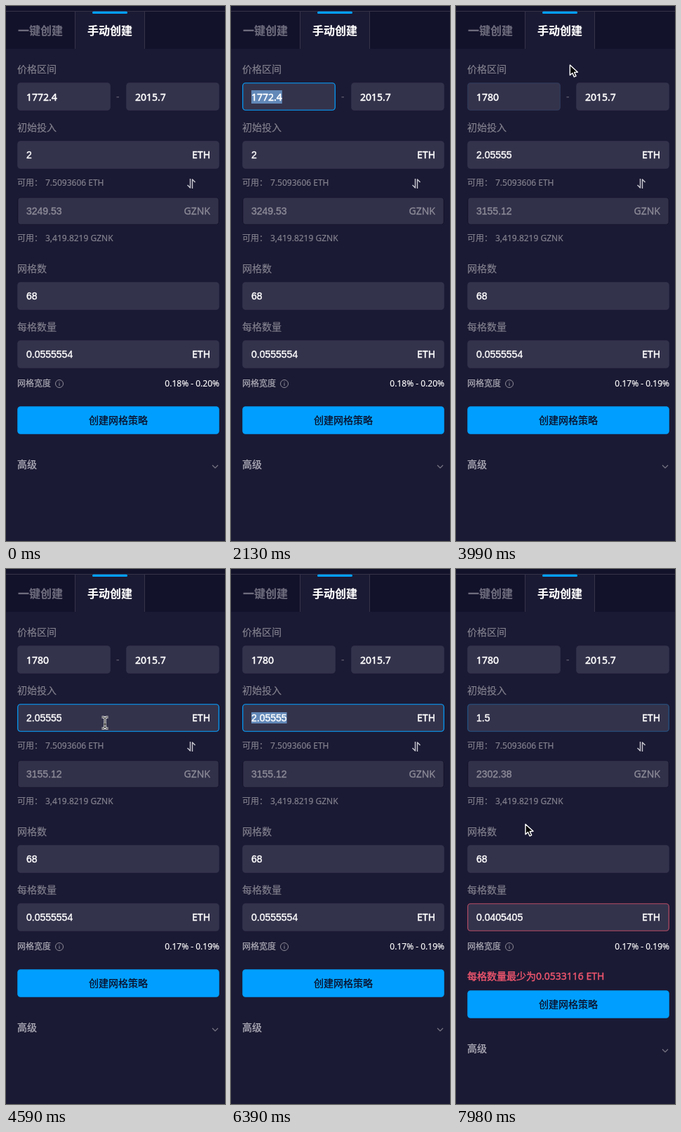
An HTML page with a canvas for the animation above (8 s loop, 312 px wide and 762 px high).

```html
<!DOCTYPE html>
<html lang="zh">
<head>
<meta charset="utf-8">
<style>
html, body { margin: 0; width: 100%; height: 100%; overflow: hidden; background: #1b1a34; }
canvas { display: block; width: 312px; height: 762px; }
</style>
</head>
<body>
<canvas id="stage"></canvas>
<script>
const LOOP = 8000;
const COIN = 'ETH', STABLE = 'GZNK';
const UI = '"Noto Sans", "Noto Sans CJK SC", "Noto Sans CJK", sans-serif';
const ARIAL = '"Liberation Sans", Arial, sans-serif';
const BG = '#1b1a34', FIELD = '#34334c', LINE = '#343349', BLUE = '#009fff', RED = '#f0566e';
const LABEL = '#858491', DIM = '#8c8b98', WHITE = '#fff', DARK = '#0b0a20', SELECTED = '#6288b8';

// Events, in ms
const PRICE_FOCUS = 960, PRICE_SELECT = 1290, PRICE_TYPE = 2160, PRICE_BLUR = 3780;
const COIN_HOVER = 4260, DRAG_START = 4800, DRAG_END = 5610, COIN_TYPE = 6420, COIN_BLUR = 7850;

const canvas = document.getElementById('stage');
const ratio = window.devicePixelRatio || 1;
canvas.width = 312 * ratio;
canvas.height = 762 * ratio;
const ctx = canvas.getContext('2d');

const clamp = (v, lo = 0, hi = 1) => Math.min(hi, Math.max(lo, v));
const easeOut = p => 1 - (1 - p) ** 2;
const fade = (t, start) => easeOut(clamp((t - start) / 300));
const between = (t, start, end) => t >= start && t < end;

function typed(t, str, start, gap) {
  const count = Math.min(str.length, 1 + Math.floor((t - start) / gap));
  return { value: str.slice(0, count), lastKey: start + (count - 1) * gap };
}

function formAt(t) {
  const priceKeys = typed(t, '1780', PRICE_TYPE, 260);
  const coinKeys = typed(t, '1.5', COIN_TYPE, 210);
  const repriced = t >= PRICE_BLUR, failed = t >= COIN_BLUR;
  const price = t < PRICE_TYPE ? '1772.4' : priceKeys.value;
  const low = price.length < 4 || repriced ? +price : 1772.4;
  const step = (2015.7 - low) / 68;
  return {
    price, priceKeys, coinKeys, failed,
    invest: t >= COIN_TYPE ? coinKeys.value : repriced ? '2.05555' : '2',
    counter: failed ? '2302.38' : repriced ? '3155.12' : '3249.53',
    perGrid: ((failed ? 1.5 : 2.05555) / 37).toFixed(7),
    width: [2015.7, low].map(p => (step / p * 100).toFixed(2) + '%').join(' - ')
  };
}

const place = (x, y) => ({ x, y });
const START = place(195, 603), PRICE = place(97, 129), TAB = place(168, 40), COIN_MID = place(141, 217),
  COIN_RIGHT = place(84, 214), COIN_LEFT = place(26, 213), REST = place(98, 363);

const glide = (start, end, from, to, hideAt = LOOP) => ({ start, end, from, to, hideAt });
const MOVES = [
  glide(90, 450, START, PRICE, PRICE_TYPE - 30),
  glide(3360, 3510, PRICE, TAB),
  glide(3900, 4590, TAB, COIN_MID),
  glide(4590, 4830, COIN_MID, COIN_RIGHT),
  glide(4830, 5370, COIN_RIGHT, COIN_LEFT, COIN_TYPE - 30),
  glide(7470, 7740, COIN_LEFT, REST)
];

function pointerAt(t) {
  const move = MOVES.filter(m => m.start <= t).pop();
  if (!move || t >= move.hideAt) return null;
  const { start, end, from, to } = move;
  const p = easeOut(clamp((t - start) / (end - start)));
  return place(from.x + (to.x - from.x) * p, from.y + (to.y - from.y) * p);
}

const clicked = (t, start) => between(t, start, start + 120);
const isPressed = t => between(t, DRAG_START, DRAG_END) ||
  [840, 1080, PRICE_SELECT, PRICE_BLUR - 90, COIN_BLUR - 50].some(start => clicked(t, start));

function stroke(color, width) {
  ctx.strokeStyle = color;
  ctx.lineWidth = width;
  ctx.stroke();
}

// `ink` thickens the strokes of the letters without changing their spacing.
function text(str, x, y, color, { size = 14, weight = 400, family = UI, align = 'left', ink = 0.15 } = {}) {
  ctx.font = `${weight} ${size}px ${family}`;
  ctx.textAlign = align;
  ctx.fillStyle = ctx.strokeStyle = color;
  ctx.lineWidth = ink;
  ctx.lineJoin = 'round';
  ctx.fillText(str, x, y);
  ctx.strokeText(str, x, y);
}

const small = (str, x, y, color = LABEL, align) => text(str, x, y, color, { size: 12, align });
const strong = (str, x, y, align) => text(str, x, y, WHITE, { weight: 500, ink: 0.5, align });
const number = (str, x, y, color = WHITE) => text(str, x, y, color, { family: ARIAL, ink: 0.4 });

function textWidth(str, family) {
  ctx.font = `14px ${family}`;
  return ctx.measureText(str).width;
}

function rect(x, y, w, h, color) {
  ctx.fillStyle = color;
  ctx.fillRect(x, y, w, h);
}

function roundBox(x, y, w, h, inset, radius) {
  ctx.beginPath();
  ctx.roundRect(x + inset, y + inset, w - 2 * inset, h - 2 * inset, radius);
}

function box(x, y, w, color = FIELD) {
  roundBox(x, y, w, 40, 0.25, 4.5);
  ctx.fillStyle = color;
  ctx.fill();
}

function outline(x, y, w, color, alpha = 1) {
  ctx.globalAlpha = alpha;
  roundBox(x, y, w, 40, 0.75, 4);
  stroke(color, 1.2);
  ctx.globalAlpha = 1;
}

function lines(...paths) {
  ctx.beginPath();
  for (const [start, ...rest] of paths) {
    ctx.moveTo(...start);
    rest.forEach(p => ctx.lineTo(...p));
  }
}

function caret(t, { value, lastKey }, family, y, h) {
  const visible = Math.floor((t - lastKey) / 475) % 2 === 0;
  if (visible) rect(Math.floor(29 + textWidth(value, family)), y, 1, h, WHITE);
}

function drawTabs() {
  rect(0, 0, 312, 61, '#13122b');
  rect(98, 7, 100, 54, LINE);
  rect(99, 8, 98, 53, BG);
  rect(0, 7, 312, 1, LINE);
  roundBox(123, 7.7, 50, 3.3, 0, 1.6);
  ctx.fillStyle = BLUE;
  ctx.fill();
  text('一键创建', 17, 41, '#6d6c7d', { size: 16, weight: 700 });
  text('手动创建', 116, 41, WHITE, { size: 16, weight: 700 });
}

function drawPrices(t, { price, priceKeys }) {
  text('价格区间', 16, 95, LABEL);
  box(16, 109, 133);
  box(171, 109, 133);
  outline(16, 109, 133, BLUE, fade(t, PRICE_FOCUS) - fade(t, PRICE_BLUR));
  if (between(t, PRICE_SELECT, PRICE_TYPE)) rect(29, 120, textWidth(price, UI), 19, SELECTED);
  strong(price, 29, 135);
  if (between(t, PRICE_TYPE, PRICE_BLUR)) caret(t, priceKeys, UI, 120, 18);
  text('-', 157, 134, '#5b5a6d');
  strong('2015.7', 184, 135);
}

function drawInvestment(t, { invest, coinKeys, counter }, pointer) {
  text('初始投入', 16, 178, LABEL);
  box(16, 192, 288);
  outline(16, 192, 288, BLUE, fade(t, COIN_HOVER) - fade(t, COIN_BLUR));
  if (between(t, DRAG_START, COIN_TYPE)) {
    const first = pointer ? clamp(Math.round((pointer.x - 29) / 7.4), 0, invest.length) : 0;
    const left = textWidth(invest.slice(0, first), ARIAL);
    rect(29 + left, 204, textWidth(invest, ARIAL) - left, 16, SELECTED);
  }
  number(invest, 29, 217);
  if (between(t, COIN_TYPE, COIN_BLUR)) caret(t, coinKeys, ARIAL, 204, 16);
  strong(COIN, 291, 217, 'right');

  small('可用：', 16, 256);
  small('7.5093606 ' + COIN, 56, 256);
  lines([[262.5, 246], [262.5, 259], [258.5, 255]], [[265.5, 260], [265.5, 247], [269.5, 251]]);
  stroke('#c9c9d2', 1.4);

  box(16, 272, 288, '#32314a');
  outline(16, 272, 288, '#12112a');
  number(counter, 29, 297, DIM);
  text(STABLE, 291, 297, DIM, { align: 'right', ink: 0.3 });
  small('可用：', 16, 335);
  small('3,419.8219 ' + STABLE, 56, 335);
}

function drawGrid(t, { perGrid, width }) {
  text('网格数', 16, 379, LABEL);
  box(16, 393, 288);
  number('68', 29, 418);
  text('每格数量', 16, 462, LABEL);
  box(16, 476, 288);
  outline(16, 476, 288, RED, fade(t, COIN_BLUR));
  number(perGrid, 29, 501);
  strong(COIN, 291, 501, 'right');

  small('网格宽度', 16, 542, '#b5b4be');
  ctx.beginPath();
  ctx.arc(76, 538, 5.5, 0, 7);
  stroke(DIM, 1);
  rect(75.5, 535, 1, 1, DIM);
  rect(75.5, 537, 1, 4, DIM);
  small(width, 304, 542, WHITE, 'right');
}

function drawFooter({ failed }) {
  if (failed) text('每格数量最少为0.0533116 ' + COIN, 16, 585, RED, { ink: 0.4 });
  ctx.save();
  if (failed) ctx.translate(0, 30);
  box(16, 570, 288, BLUE);
  text('创建网格策略', 160, 595, DARK, { weight: 500, align: 'center', ink: 0.25 });
  text('高级', 16, 658, '#b0afba', { weight: 500, ink: 0.3 });
  lines([[294, 654], [298, 658], [302, 654]]);
  stroke('#777685', 1.1);
  ctx.restore();
}

function drawRing() {
  for (const [color, width] of [[WHITE, 5.5], ['#000', 3]]) {
    ctx.beginPath();
    ctx.arc(1, 2, 20, 0, 7);
    stroke(color, width);
  }
}

function drawHand() {
  ctx.fillStyle = WHITE;
  for (let finger = 0; finger < 4; finger++) {
    const top = finger ? finger * 0.7 - 1 : -5;
    roundBox(-3 + finger * 3, top, 3, 9 - top, 0, 1.5);
    stroke('#000', 1.4);
    ctx.fill();
  }
  roundBox(-5, 4, 13, 8, 0, 3);
  ctx.fill();
  stroke('#000', 0.8);
}

function drawBeam() {
  lines([[-4, -6], [-1, -6], [0.5, -4], [2, -6], [5, -6]], [[0.5, -4], [0.5, 8]],
    [[-4, 10], [-1, 10], [0.5, 8], [2, 10], [5, 10]], [[-1.5, 4], [2.5, 4]]);
  stroke(WHITE, 3);
  stroke('#000', 1);
}

function drawArrow() {
  lines([[1, 0.5], [1, 15], [4.5, 11.8], [7, 17.3], [9.7, 16.1], [7.2, 10.8], [12, 10.6]]);
  ctx.closePath();
  ctx.fillStyle = '#000';
  ctx.fill();
  stroke(WHITE, 1.4);
}

function drawPointer(t, { x, y }) {
  const overField = between(y, 109, 149) || between(y, 192, 232) || between(y, 272, 312);
  ctx.save();
  ctx.translate(x, y);
  if (isPressed(t)) drawRing();
  if (y < 61) drawHand();
  else if (overField && t >= PRICE_FOCUS) drawBeam();
  else drawArrow();
  ctx.restore();
}

function draw(t) {
  const form = formAt(t), pointer = pointerAt(t);
  ctx.setTransform(ratio, 0, 0, ratio, 0, 0);
  rect(0, 0, 312, 762, BG);
  drawTabs();
  drawPrices(t, form);
  drawInvestment(t, form, pointer);
  drawGrid(t, form);
  drawFooter(form);
  if (pointer) drawPointer(t, pointer);
}

const start = performance.now();
function tick() {
  draw((performance.now() - start) % LOOP);
  requestAnimationFrame(tick);
}
tick();
</script>
</body>
</html>
```
